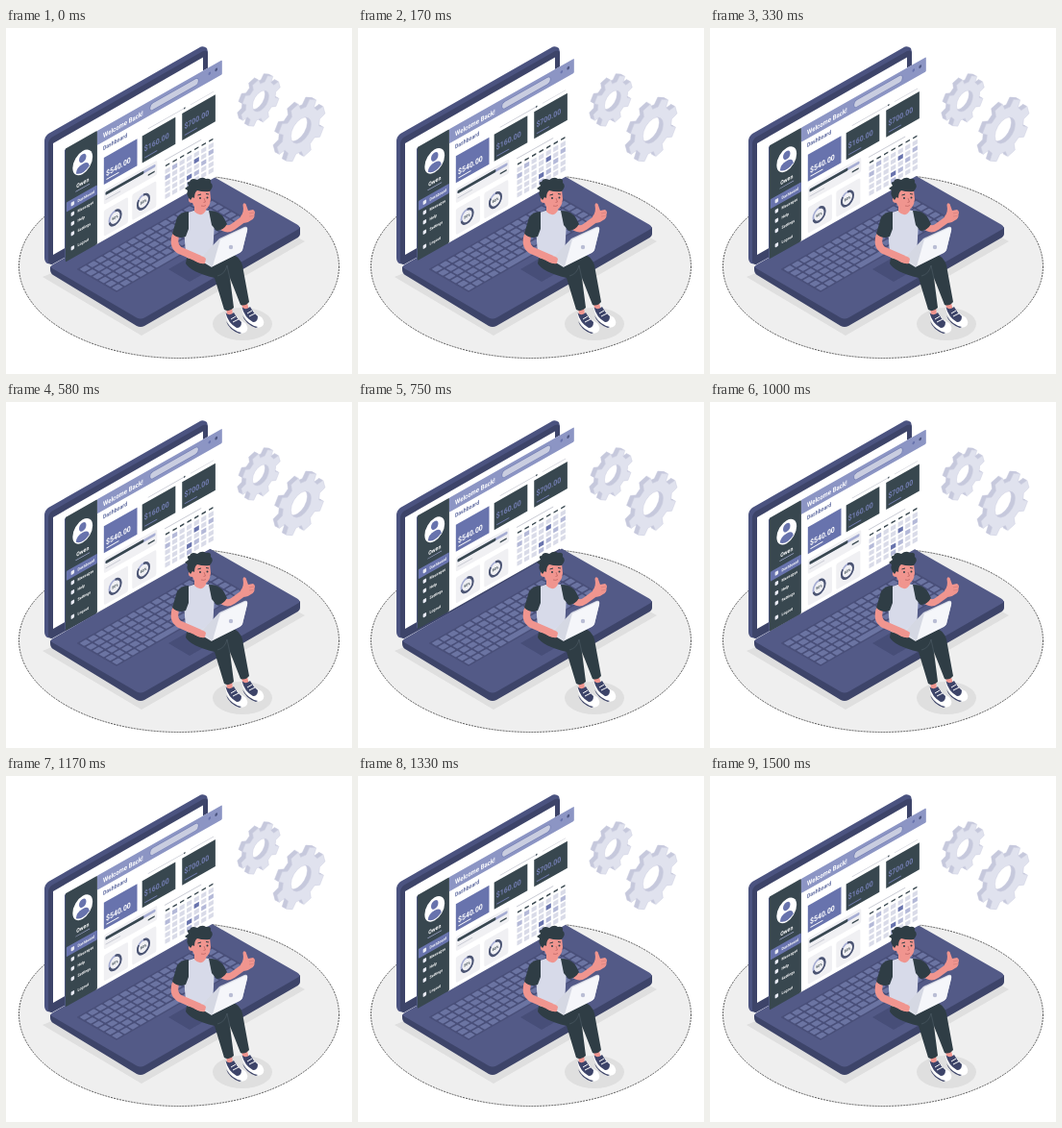
Recreate the animation shown at these times as an HTML page. Size 360 by 360 pixels, loop 1540 ms.

```html
<!DOCTYPE html>
<html lang="en">
<head>
<meta charset="utf-8">
<title>Dashboard on a laptop</title>
<style>
  html, body { margin: 0; height: 100%; overflow: hidden; background: #fff; }
  svg { display: block; width: 100vw; height: 100vh; }
  text { font-family: Roboto, sans-serif; font-weight: 700; }
  .ink { fill: #2f3d45; }
  .navy { fill: #3d4469; }
  .skin { fill: #f0958f; }
  .limb { fill: none; stroke: #f0958f; stroke-linecap: round; stroke-linejoin: round; }
</style>
</head>
<body>
<svg viewBox="0 0 360 360">
  <ellipse cx="180" cy="248" rx="166.500" ry="95.500" fill="#efefef" stroke="#333" stroke-width=".8" stroke-dasharray="2 1"/>
  <path d="M38 259L141 320L311 222L296 214L60 250Z" fill="#dfdfdf"/>

  <!-- laptop lid -->
  <path d="M40 118Q40 113 44 110L201 20.500Q205 18 209 21L210 25V156L48 246L43 245Q40 243 40 239Z" fill="#4b5380"/>
  <path d="M44 121Q44 116 48 113.500L205 24Q210 22 210 27V156L47 246L44 244Z" fill="#3d4469"/>
  <path d="M49 120L205 30.500V147L49 236Z" fill="#fff"/>

  <!-- laptop base -->
  <path d="M46 248L140 302L306 207V214Q306 217 302 219L144 310Q140 312 136 310L49 257Q46 255 46 251Z" fill="#3d4469"/>
  <path d="M49 246L212 152.500L303 204.500Q308 207.500 303 210L144 301.500Q140 303.500 136 301.500L48 250Q45 248 49 246Z" fill="#535a87"/>
  <path d="M169 251L190 239L212 252L191 264Z" fill="#474e78"/>
  <g id="keys" transform="matrix(.831 -.475 .8 .46 75 251)"></g>

  <!-- floating dashboard -->
  <g id="panel">
    <path d="M61 127L63 125V243L61 242Z" fill="#4d577f"/>
    <g id="face" transform="matrix(.866 -.49 0 1 62 125.500)"></g>
  </g>

  <g id="gears"></g>

  <!-- person -->
  <ellipse cx="246" cy="308" rx="31" ry="17" fill="#dfdfdf"/>
  <path class="limb" stroke-width="6" d="M232 289L233 300M247 283L250 294"/>
  <path class="ink" d="M189 234Q202 228 218 232L234 235Q243 237 246 247L253 285Q249 290 244 288L233 260L237 291Q232 296 227 293L217 260Q192 254 187 245Z"/>
  <path d="M220 258Q228 256 230 247L233 261" fill="none" stroke="#4b5a64" stroke-width=".7"/>
  <g id="shoe">
    <path d="M245 291Q250 295 254 290Q259 298 266 301Q270 306 267 310Q262 314 256 309Q247 303 245 291Z" fill="#fff"/>
    <path class="navy" d="M245.500 290.500Q250 294 254 290Q257 296 262 300Q262 306 257 306Q248 301 245.500 290.500Z"/>
    <path class="navy" d="M246 299Q252 309 262 311L260 312Q249 308 246 299Z"/>
    <path d="M251 297L256 294M253 300L259 297" stroke="#fff"/>
  </g>
  <use href="#shoe" transform="translate(-17 6)"/>
  <path d="M186 194Q198 187 211 190Q217 193 217 202L215 235Q202 243 188 239Q184 214 186 194Z" fill="#d7dae9"/>
  <path class="skin" d="M196 182H208V190Q203 198 196 191Z"/>

  <path class="limb" stroke-width="7" d="M222 204Q229 212 236 207L247 199"/>
  <path class="ink" d="M211 190Q222 190 227 198L230 204Q226 211 219 211L214 205Z"/>
  <path class="skin" d="M244 196Q248 192 246.500 184Q247 181 249.500 183L252 190L257 189Q260 191 258.500 194Q259 198 255 200Q250 204 246 202Z"/>
  <path d="M253 193L258 192M253 196L257.500 195.500" stroke="#d17b79" stroke-width=".6"/>

  <path class="limb" stroke-width="7.500" d="M178 212Q172 225 180 231L203 241"/>
  <path class="ink" d="M190 191Q182 191 178 197L173 214Q179 220 187 217L190 209Z"/>

  <path d="M199 240L221 225L229 236L214 249Z" fill="#dfe1ea"/>
  <path d="M222 219L248 207Q252 206 251 210L246 231Q245 233 243 234L215 248L203 239Z" fill="#d5d8e3"/>
  <path d="M223 220L248 208Q252 207 251 211L246 231Q245 233 243 234L215 248Z" fill="#f5f6fa"/>
  <circle cx="234" cy="228" r="2.200" fill="#b9bdd4"/>
  <path class="skin" d="M197 237Q204 236 208 240L207 245Q201 246 196 242Z"/>

  <path class="skin" d="M193 168Q202 161 212 168L213 178Q212 188 205 190Q196 189 194 182Q189 182 190 177Q191 174 194 176Z"/>
  <path class="ink" d="M192 179Q187 174 189 169L186 167L190 164Q187 160 191 160Q193 155 199 158Q204 154 208 157Q214 156 213 161Q217 164 212 170Q205 171 199 169Q196 171 196 177L194 176Z"/>
  <g class="ink"><circle cx="202" cy="177" r="1"/><circle cx="209.500" cy="176.500" r="1"/></g>
  <path d="M199.500 174L203 173M208 172.500L211 173" stroke="#2f3d45"/>
  <path d="M206 177L207.500 181L205.500 181.500M203 185Q206 186 208 184.500" fill="none" stroke="#b9605f" stroke-width=".7"/>
</svg>
<script>
const LOOP = 1540, CYCLE = 1500, STEP = 1000 / 24, LIFT = 7.2;
const $ = id => document.getElementById(id);
const rect = (x, y, w, h, fill, r = 0) =>
  `<rect x="${x}" y="${y}" width="${w}" height="${h}" rx="${r}" fill="${fill}"/>`;
const dot = (x, y, r, fill) => `<circle cx="${x}" cy="${y}" r="${r}" fill="${fill}"/>`;
const label = (x, y, size, fill, text, attrs = "") =>
  `<text x="${x}" y="${y}" font-size="${size}" fill="${fill}" ${attrs}>${text}</text>`;

const INK = "#38474f", BLUE = "#6873ad", PALE = "#a6add3", SOFT = "#f0f0f3", LINE = "#c8cad3";

function keyboard() {
  let s = rect(-1, -1, 162, 52, "#494f79", 1);
  for (let row = 0; row < 6; row++) {
    for (let col = 0; col < 16; col++) {
      const space = row === 5 && col > 4 && col < 10;
      if (space && col > 5) continue;
      s += rect(col * 10 + 1, row * 8.4 + .8, space ? 48 : 8, 6.4, "#6b74a2", 1);
    }
  }
  return s;
}

function sidebar() {
  let s = rect(0, 0, 38, 118, INK, 1);
  s += dot(20.5, 24.5, 12, "#fff") + dot(20.5, 20, 4.3, BLUE);
  s += `<path d="M12.500 32Q13 26 20.500 26T28.500 32Q20.500 38 12.500 32Z" fill="${BLUE}"/>`;
  s += label(20.5, 47.5, 6, "#fff", "Owen", 'text-anchor="middle"');
  s += rect(12, 50.5, 17, .7, PALE) + rect(1, 56.5, 37, 10, BLUE, 1);
  const items = { Dashboard: 61.5, Messages: 72, Help: 82, Settings: 92.5, Logout: 107.5 };
  for (const [name, y] of Object.entries(items))
    s += rect(6.5, y - 2, 4, 4, "#e8eaf4", 1) + label(14.5, y + 1.6, 4.2, "#fff", name);
  return s;
}

function header() {
  return rect(38, 0, 150, 15, "#8c95c4", 1) + label(45, 11, 7, "#fff", "Welcome Back!") +
    rect(101, 3.5, 59, 8, "#737eb3", 4) + rect(101.7, 4.2, 57.6, 6.6, "#c9cde0", 3.3) +
    dot(173, 6.5, 1.5, BLUE) + dot(181, 6.5, 1.6, "#4d5681");
}

function cards() {
  const dim = "#737eb3";
  const data = [[46, 52.5, "$540.00", BLUE, "#fff"], [92, 49.5, "$160.00", INK, dim], [140, 49.5, "$700.00", INK, dim]];
  return data.map(([x, base, amount, fill, ink]) =>
    rect(x, 32, 40, 28, fill) + label(x + 2.5, base, 8, ink, amount) +
    rect(x + 3, 55.5, 15, 1, ink)).join("");
}

function gauge(x, share, text) {
  const r = 7, full = 2 * Math.PI * r;
  return rect(x, 87, 29, 27, SOFT, 2) +
    `<g transform="translate(${x + 13.5} 101)" fill="none" stroke-width="2.200">
      <circle r="${r}" stroke="${PALE}"/>
      <circle r="${r}" stroke="#4b5471" stroke-dasharray="${full * share} ${full}" transform="rotate(-90)"/></g>` +
    label(x + 13.5, 102.4, 4, INK, text, 'text-anchor="middle"');
}

function calendar() {
  let s = rect(119, 70, 44, 1, LINE);
  for (let col = 0; col < 7; col++) {
    s += rect(120 + col * 8.7, 76, 5, 1.6, INK);
    for (let row = 0; row < 5; row++) {
      const day = row * 7 + col;
      const fill = [11, 24].includes(day) ? BLUE : day % 6 === 1 ? "#b4b9d8" : "#d9dbe8";
      s += rect(119.5 + col * 8.7, 80.5 + row * 6.5, 6, 4.6, fill);
    }
  }
  return s;
}

function dashboard() {
  return rect(36, 0, 152, 118, "#fff", 1) + header() + sidebar() +
    label(45, 24, 6, "#5d699f", "Dashboard") +
    rect(99, 27.5, 44, .8, LINE) + dot(143, 27.9, .9, INK) +
    rect(150, 27.5, 28, .8, "#d6d7de") + cards() +
    rect(46, 66, 64, 15, SOFT, 2) + rect(48, 69, 60, 3, PALE, 1) + rect(48, 69, 46, 3, INK, 1) +
    rect(48, 76, 18, 1, LINE) + rect(99, 75.5, 8, 1.5, INK) +
    gauge(46, .7, "50%") + gauge(80, .85, "80%") + calendar();
}

function gear(cx, cy, radius, turn) {
  const teeth = 8, points = [];
  for (let i = 0; i < teeth; i++) {
    for (const [step, k] of [[-.31, .77], [-.2, 1], [.2, 1], [.31, .77]]) {
      const a = (i + step) / teeth * 2 * Math.PI + turn;
      points.push([Math.cos(a) * radius * k, Math.sin(a) * radius * k].map(v => v.toFixed(2)));
    }
  }
  const h = radius * .42;
  const d = `M${points.join("L")}ZM${h} 0A${h} ${h} 0 1 0 ${-h} 0A${h} ${h} 0 1 0 ${h} 0Z`;
  let s = "";
  for (let depth = 4; depth >= 0; depth--) {
    const [fill, edge] = depth ? ["#c6c9dc", "#c6c9dc"] : ["#e0e2ee", "#cfd2e2"];
    s += `<path d="${d}" transform="matrix(.866 -.5 0 1 ${cx + 1.5 - depth} ${cy + 1 - depth * .55})"
      fill="${fill}" fill-rule="evenodd" stroke="${edge}" stroke-width=".5"/>`;
  }
  return s;
}

$("keys").innerHTML = keyboard();
$("face").innerHTML = dashboard();
$("gears").innerHTML = gear(263.5, 75, 23.5, .52) + gear(305.5, 105.5, 29, .52);

// Linear rise and fall, shown at 24 pictures per second.
function draw() {
  const t = Math.floor((performance.now() % LOOP + 5) / STEP) * STEP;
  const lift = LIFT * (1 - Math.abs(1 - 2 * Math.min(t, CYCLE) / CYCLE));
  $("panel").setAttribute("transform", `translate(0 ${-lift})`);
  requestAnimationFrame(draw);
}
draw();
</script>
</body>
</html>
```
